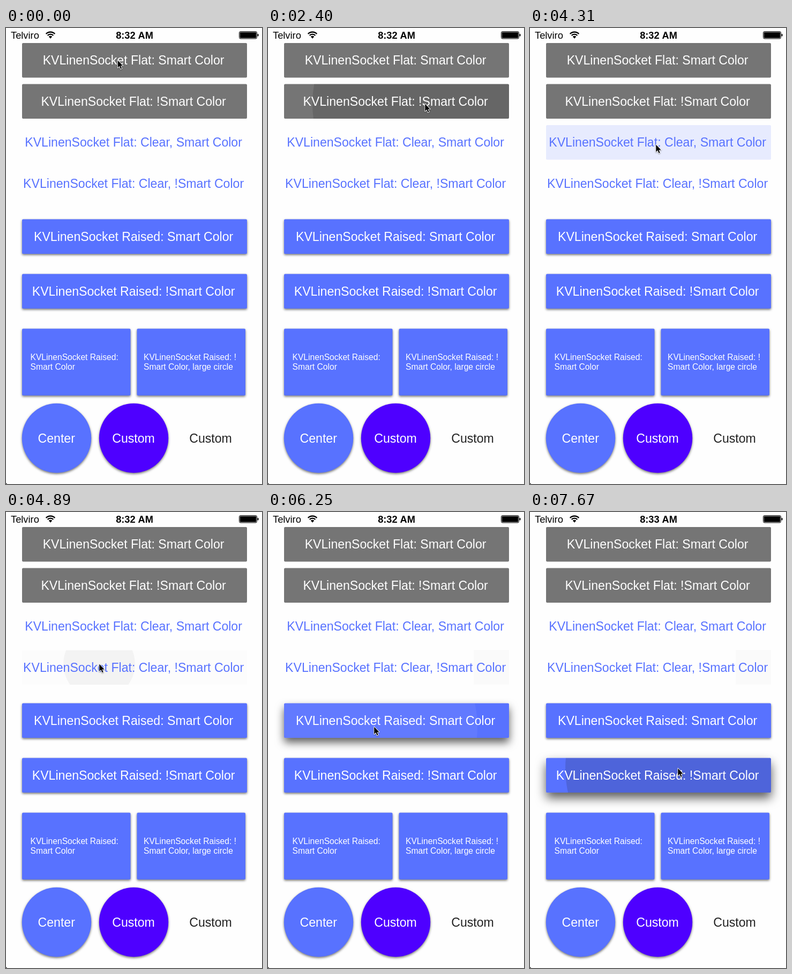
Animation of 478x850 px, one loop 8000 ms. Source, as an HTML page with a canvas:

```html
<!DOCTYPE html>
<html lang="en">
<head>
<meta charset="utf-8">
<title>Paper buttons</title>
<style>
html, body { margin: 0; width: 100%; height: 100%; overflow: hidden; background: #fefefe; }
canvas { display: block; }
</style>
</head>
<body>
<canvas id="stage" width="478" height="850"></canvas>
<script>
const ctx = document.getElementById('stage').getContext('2d');
const LOOP = 8000;
const SANS = '"Liberation Sans", Arial, sans-serif';
const BLUE = '#5872ff', GRAY = '#757575', PURPLE = '#4e00ff';
const NAME = 'KVLinenSocket';
const LEFT = 30, WIDTH = 420, HEIGHT = 64.5;
const GROW = 210, BURST = 300, RADIUS = 210;

// tint: ripple colour and alpha; fade: alpha of the background tint
const white = { rgb: '255,255,255', alpha: 0.06, fade: 0 };
const dark = { rgb: '26,26,26', alpha: 0.16, fade: 0 };
const rows = [
  { y: 28, fill: GRAY, text: 'Flat: Smart Color', tint: white,
    tap: [209, 60], down: 670, up: 1460 },
  { y: 104.5, fill: GRAY, text: 'Flat: !Smart Color', tint: dark,
    tap: [293, 141], down: 2060, up: 2880 },
  { y: 181, text: 'Flat: Clear, Smart Color',
    tint: { rgb: '88,114,255', alpha: 0.12, fade: 0.03 },
    tap: [235.5, 217], down: 3530, up: 4300 },
  { y: 257.5, text: 'Flat: Clear, !Smart Color',
    tint: { rgb: '77,77,77', alpha: 0.12, fade: 0.03 },
    tap: [174, 283], down: 4850, up: 5490 },
  { y: 356.5, fill: BLUE, raised: true, text: 'Raised: Smart Color', tint: white,
    tap: [198, 400], down: 6090, up: 6770 },
  { y: 458.5, fill: BLUE, raised: true, text: 'Raised: !Smart Color', tint: dark,
    tap: [276, 477.5], down: 7440, up: Infinity }
];

// pointer stops: time, x, y
const path = [
  [1600, 208.5, 60], [2040, 293, 141],
  [3050, 293, 141], [3500, 235, 217],
  [4430, 235, 217], [4830, 174, 283],
  [5640, 174, 283], [5930, 131.5, 362], [6080, 198, 400],
  [7000, 198, 400], [7410, 276, 477.5]
];

const clamp = v => Math.max(0, Math.min(1, v));
const smooth = v => v * v * (3 - 2 * v);

// y of cubic-bezier(0, 0, .58, 1)
function easeOut(x) {
  let a = 0, b = 1;
  for (let i = 0; i < 16; i++) {
    const s = (a + b) / 2;
    if (1.74 * (1 - s) * s * s + s * s * s < x) a = s; else b = s;
  }
  return 3 * (1 - a) * a * a + a * a * a;
}

function box(x, y, w, h, r) {
  ctx.beginPath();
  ctx.roundRect(x, y, w, h, r);
}

function disc(x, y, r) {
  ctx.beginPath();
  ctx.arc(x, y, r, 0, Math.PI * 2);
}

function text(str, x, y, size, color, align = 'center', weight = 'normal') {
  ctx.font = `${weight} ${size}px ${SANS}`;
  ctx.textAlign = align;
  ctx.fillStyle = color;
  ctx.fillText(str, x, y);
}

function fillRaised(color, lift = 0) {
  ctx.save();
  ctx.shadowColor = `rgba(0,0,0,${0.55 + 0.1 * lift})`;
  ctx.shadowBlur = 4.5 + 14.5 * lift;
  ctx.shadowOffsetY = 2 + 8 * lift;
  ctx.fillStyle = color;
  ctx.fill();
  ctx.restore();
}

function drawRipple(b, t) {
  const age = t - b.down, gone = t - b.up;
  if (age < 0 || gone > BURST) return;
  const out = clamp(gone / BURST);
  const shown = clamp(age / 100) * (1 - out);
  const r = 5 + (RADIUS - 5) * easeOut(clamp(age / GROW)) + 150 * easeOut(out);
  ctx.save();
  box(LEFT, b.y, WIDTH, HEIGHT, 2);
  ctx.clip();
  ctx.fillStyle = `rgba(${b.tint.rgb},${b.tint.fade * shown})`;
  ctx.fillRect(LEFT, b.y, WIDTH, HEIGHT);
  ctx.fillStyle = `rgba(${b.tint.rgb},${b.tint.alpha * shown})`;
  disc(b.tap[0], b.tap[1], r);
  ctx.fill();
  ctx.restore();
}

function drawRow(b, t) {
  if (b.fill) {
    box(LEFT, b.y, WIDTH, HEIGHT, 2);
    if (b.raised) {
      const lift = smooth(clamp((t - b.down) / 220)) * (1 - smooth(clamp((t - b.up) / 220)));
      fillRaised(b.fill, lift);
    } else {
      ctx.fillStyle = b.fill;
      ctx.fill();
    }
  }
  drawRipple(b, t);
  text(`${NAME} ${b.text}`, 238.1, b.y + 40.4, 23.1, b.fill ? '#fff' : BLUE);
}

function drawStatus(t) {
  text('Telviro', 9, 20, 18.3, '#000', 'left');
  text(t < 6610 ? '8:32 AM' : '8:33 AM', 240, 20, 18.2, '#000', 'center', 'bold');

  ctx.strokeStyle = ctx.fillStyle = '#000';
  ctx.lineWidth = 2.3;
  for (const r of [7.6, 11.8]) {
    ctx.beginPath();
    ctx.arc(83, 19.3, r, -Math.PI * 0.75, -Math.PI * 0.25);
    ctx.stroke();
  }
  ctx.beginPath();
  ctx.moveTo(83, 19.8);
  ctx.arc(83, 19.3, 4.6, -Math.PI * 0.75, -Math.PI * 0.25);
  ctx.fill();

  ctx.lineWidth = 1;
  box(435.5, 6.5, 33, 13.5, 2.5);
  ctx.stroke();
  box(436.7, 7.7, 30.6, 11.1, 1.2);
  ctx.fill();
  box(469.6, 11, 2, 4.6, 1);
  ctx.fill();
}

function drawLower() {
  for (const x of [LEFT, 244.5]) {
    box(x, 560.5, 202.5, 124.5, 2);
    fillRaised(BLUE);
  }
  const small = (s, x, y) => text(s, x, y, 15.65, '#fff', 'left');
  small(`${NAME} Raised:`, 45.5, 619);
  small('Smart Color', 45.5, 636.5);
  small(`${NAME} Raised: !`, 257, 619);
  small('Smart Color, large circle', 257, 636.5);

  disc(94.5, 764.5, 64.7);
  fillRaised(BLUE);
  disc(238.5, 764.5, 64.7);
  fillRaised(PURPLE);
  text('Center', 94.2, 773, 23.1, '#fff');
  text('Custom', 238, 773, 23.1, '#fff');
  text('Custom', 382, 773, 23.1, '#222');
}

function pointerAt(t) {
  let a = path[0];
  for (const b of path) {
    if (t < b[0]) {
      const k = smooth(clamp((t - a[0]) / (b[0] - a[0] || 1)));
      return [a[1] + (b[1] - a[1]) * k, a[2] + (b[2] - a[2]) * k];
    }
    a = b;
  }
  return [a[1], a[2]];
}

function drawPointer(t) {
  const [x, y] = pointerAt(t);
  ctx.save();
  ctx.translate(x, y);
  ctx.beginPath();
  ctx.moveTo(0.3, 0.5);
  ctx.lineTo(0.3, 14);
  ctx.lineTo(3.4, 11.1);
  ctx.lineTo(5.6, 16.3);
  ctx.lineTo(7.7, 15.4);
  ctx.lineTo(5.5, 10.4);
  ctx.lineTo(9.6, 10.2);
  ctx.closePath();
  ctx.lineJoin = 'round';
  ctx.lineWidth = 1.8;
  ctx.strokeStyle = '#fff';
  ctx.shadowColor = 'rgba(0,0,0,.4)';
  ctx.shadowBlur = 2;
  ctx.shadowOffsetY = 1;
  ctx.stroke();
  ctx.shadowColor = 'transparent';
  ctx.fillStyle = '#000';
  ctx.fill();
  ctx.restore();
}

function draw(t) {
  ctx.fillStyle = '#fefefe';
  ctx.fillRect(0, 0, 478, 850);
  // faint tint that stays beside the fourth ripple
  if (t > rows[3].up) {
    ctx.fillStyle = '#fafafa';
    ctx.fillRect(384, 257.5, 66, 64);
  }
  drawStatus(t);
  for (const b of rows) drawRow(b, t);
  drawLower();
  ctx.fillStyle = '#000';
  ctx.beginPath();
  ctx.moveTo(0, 847.5);
  ctx.quadraticCurveTo(0.5, 849.5, 2.5, 850);
  ctx.lineTo(0, 850);
  ctx.fill();
  drawPointer(t);
}

const start = performance.now();
function tick() {
  draw((performance.now() - start) % LOOP);
  requestAnimationFrame(tick);
}
tick();
</script>
</body>
</html>
```
